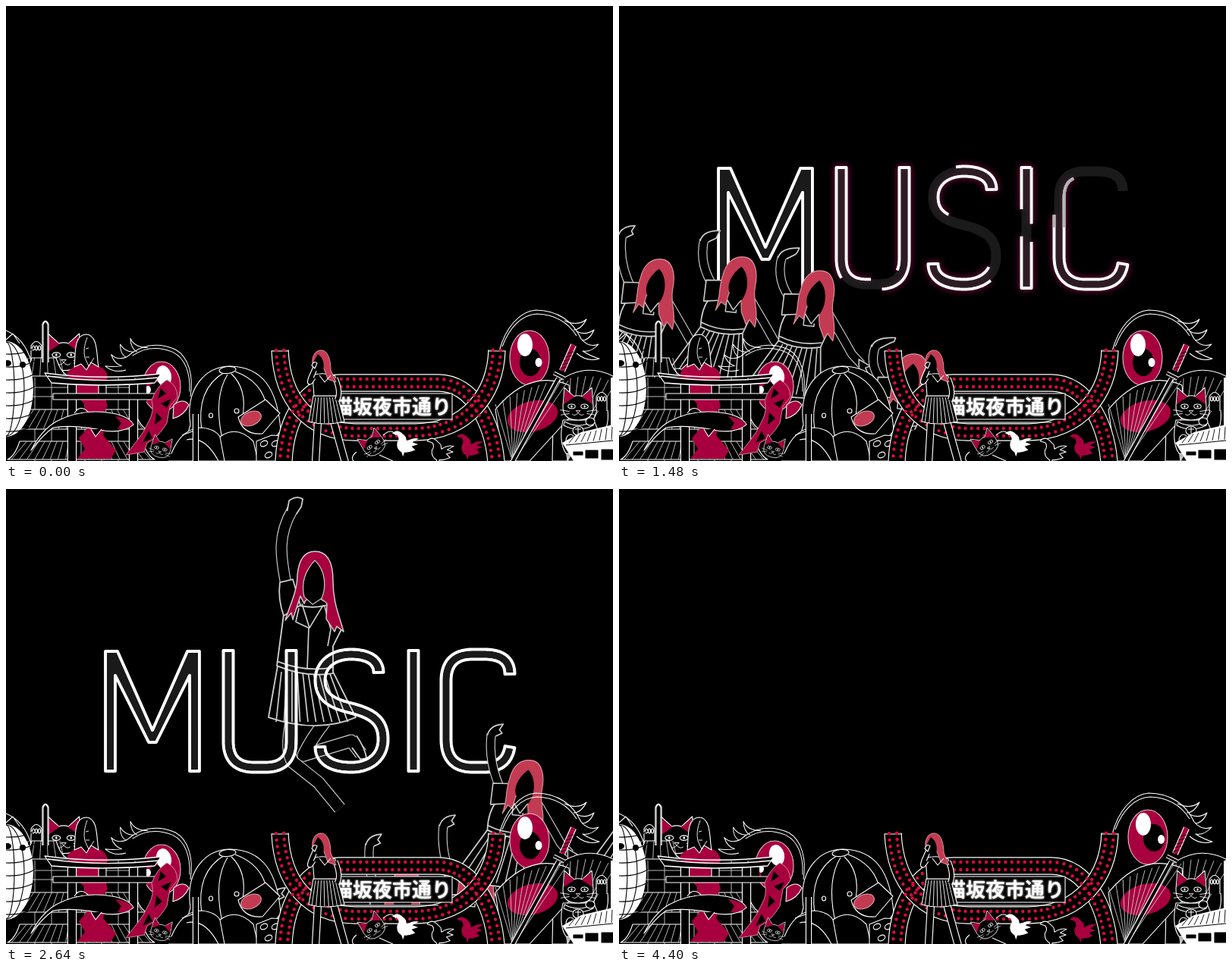
An HTML page with a canvas for the animation above (4.44 s loop, 800 px wide and 600 px high).

```html
<!DOCTYPE html>
<html lang="ja">
<meta charset="utf-8">
<title>MUSIC</title>
<style>
html,body{margin:0;width:100%;height:100%;overflow:hidden;background:#000}
canvas{display:block}
svg{position:absolute}
</style>
<canvas id="stage" width="800" height="600"></canvas>
<svg width="0" height="0"><path id="probe"/></svg>
<script>
const LOOP = 4440, STEP = 40;
const BLACK = '#000', WHITE = '#fff', RED = '#a8003f', ROSE = '#c23b52', GREY = '#ccc';
const stage = document.getElementById('stage').getContext('2d');
const probe = document.getElementById('probe');
let g = stage;

const clamp = v => Math.max(0, Math.min(1, v));
const mix = (a, b, p) => a + (b - a) * p;

// ---- drawing helpers ----
function shape(d, fill, line, w = 1.1) {
  const p = d instanceof Path2D ? d : new Path2D(d);
  if (fill) { g.fillStyle = fill; g.fill(p); }
  if (line) { g.strokeStyle = line; g.lineWidth = w; g.stroke(p); }
}
function tube(d, w, line = WHITE, fill = BLACK, edge = 2.3) {
  shape(d, null, line, w + edge);
  shape(d, null, fill, w);
}
function oval(x, y, rx, ry, fill, line, turn = 0) {
  const p = new Path2D();
  p.ellipse(x, y, rx, ry, turn, 0, 7);
  shape(p, fill, line);
}
function rays(n, f, line = WHITE, w = .9) {
  let d = '';
  for (let i = 0; i < n; i++) {
    const [a, b, c, e] = f(i);
    d += `M${a},${b}L${c},${e}`;
  }
  shape(d, null, line, w);
}
function placed(x, y, s, turn, draw) {
  g.save();
  g.translate(x, y); g.rotate(turn); g.scale(s, Math.abs(s));
  draw();
  g.restore();
}
function sample(d, step) {
  probe.setAttribute('d', d);
  const len = probe.getTotalLength(), n = Math.round(len / step), out = [];
  for (let i = 0; i <= n; i++) {
    const at = i / n * len;
    const p = probe.getPointAtLength(at);
    const a = probe.getPointAtLength(Math.max(0, at - .5));
    const b = probe.getPointAtLength(Math.min(len, at + .5));
    const m = Math.hypot(b.x - a.x, b.y - a.y) || 1;
    out.push([p.x, p.y, (b.y - a.y) / m, (a.x - b.x) / m]);
  }
  return out;
}

// ---- lettering ----
function contour(d, half = 6.6) {
  const pts = sample(d, 2.5);
  const side = k => pts.map(([x, y, nx, ny]) => `${x + nx * k},${y + ny * k}`);
  return 'M' + side(half).concat(side(-half).reverse()).join('L') + 'Z';
}
// into/done: outline drawn; out/fade: outline lost; dim: greyed area and its time span
const letters = [
  { d: 'M131,372V214H147L193,318 239,214H255V372H242V246L198,334H188L144,246V372Z',
    into: 300, done: 1000, out: 2950, fade: 1000 },
  { d: contour('M293,213V333Q293,367 327,367H342Q376,367 376,333V213'),
    into: 780, done: 1560, out: 3010, fade: 750, dim: [335, 200, 60, 180, 0, 1400] },
  { d: contour('M491,242C491,225 475,218 455,218C430,218 414,232 414,252C414,275 430,283 455,289C482,296 497,305 497,330C497,353 480,367 455,367C430,367 414,358 414,340'),
    into: 1130, done: 1680, out: 3280, fade: 930 },
  { d: contour('M537,213V372'),
    into: 860, done: 1580, out: 3200, fade: 550, dim: [520, 200, 40, 92, 1500, 2000] },
  { d: contour('M664,244C664,228 655,218 630,218H615Q580,218 580,253V330Q580,367 615,367H630Q660,367 664,340'),
    into: 1040, done: 1740, out: 3300, fade: 1000, start: 70, dim: [560, 200, 120, 92, 0, 2000] }
];
for (const l of letters) {
  probe.setAttribute('d', l.d);
  l.len = probe.getTotalLength();
  l.path = new Path2D(l.d);
}
function drawLetter(l, t) {
  const gone = clamp((t - l.out) / l.fade), p = clamp((t - l.into) / (l.done - l.into));
  g.save();
  g.globalAlpha = clamp((t - 40) / 400) * (1 - gone);
  if (p > 0) {
    const half = l.len / 2, a = half / 2 * p, b = half / 2 * clamp(p * 1.5 - .5);
    if (p < 1) {
      g.setLineDash(l.start ? [l.len * p, l.len] : [a, half - 2 * a, a + b, half - 2 * b, b, 0]);
      g.lineDashOffset = -(l.start || 0);
    }
    const leaving = t >= l.out ? clamp(1.25 - 1.7 * gone) : 0;
    const glow = t < l.done + 400 ? 1 : leaving;
    g.shadowColor = `rgba(230,20,120,${.8 * glow})`;
    g.shadowBlur = glow ? 8 : 0;
    shape(l.path, null, `rgb(255,${255 - 75 * leaving},${255 - 30 * leaving})`, 3.8);
    g.shadowBlur = 0;
    const [x, y, w, h, from, to] = l.dim || [];
    if (l.dim && t >= from && t < to) {
      g.save();
      g.beginPath(); g.rect(x, y, w, h); g.clip();
      shape(l.path, null, '#aaa', 4);
      g.restore();
    }
    // keep the glow out of the letter's body
    g.clip(l.path);
    if (glow) shape(l.path, 'rgba(0,0,0,.55)');
    shape(l.path, null, `rgb(255,${255 - 75 * leaving},${255 - 30 * leaving})`, 3.8);
    if (l.dim && t >= from && t < to) {
      g.beginPath(); g.rect(x, y, w, h); g.clip();
      shape(l.path, null, '#aaa', 4);
    }
  }
  g.restore();
}
function drawBody(l, t) {
  g.save();
  g.globalAlpha = clamp((t - 40) / 400) * (1 - clamp((t - l.out) / l.fade));
  shape(l.path, 'rgba(255,255,255,.1)');
  g.restore();
}

// ---- dancers ----
// each row: time, x, y of the head
const dancers = [
  [[600, -60, 640], [1120, -2, 372], [1800, 92, 430], [2200, 130, 640]],
  [[800, 40, 640], [1120, 87, 393], [1800, 213, 390], [2280, 248, 484], [2550, 262, 640]],
  [[900, 165, 640], [1120, 195, 447], [1800, 315, 369], [2280, 375, 420], [2700, 400, 640]],
  [[1080, 362, 680], [1800, 408, 374], [2280, 490, 384], [2850, 540, 640]],
  [[1400, 450, 640], [1800, 505, 417], [2280, 588, 368], [2900, 640, 640]],
  [[1600, 590, 640], [1800, 618, 494], [2280, 682, 384], [3000, 678, 450], [3300, 690, 640]],
  [[1900, 730, 640], [2280, 788, 432], [2600, 850, 370], [3000, 900, 640]]
];
function track(keys, t) {
  const i = keys.findIndex(k => k[0] > t) - 1;
  if (i < 0) return null;
  const a = keys[i], b = keys[i + 1], span = b[0] - a[0], u = (t - a[0]) / span;
  const slope = (j, c) => {
    const p = keys[Math.max(0, j - 1)], q = keys[Math.min(keys.length - 1, j + 1)];
    return (q[c] - p[c]) / (q[0] - p[0]) * span;
  };
  return [1, 2].map(c => {
    const v = u * u * (3 - 2 * u);
    return mix(a[c], b[c], v) + slope(i, c) * u * (1 - u) ** 2 - slope(i + 1, c) * u * u * (1 - u);
  });
}
function dancer(p) {
  const m = (a, b) => mix(a, b, p);
  shape('M-42,64Q-15,74 14,66L22,132Q-30,142 -78,128Z', BLACK, GREY, 1.7);
  rays(8, i => [-36 + 6.5 * i, 68, -68 + 11.5 * i, 132], GREY, 1.5);
  tube('M20,22Q40,48 56,70L70,82', 10, GREY);
  shape('M66,76L82,83 76,86 80,93 68,90Z', BLACK, GREY, 1.5);
  const wx = m(-50, -52), wy = m(-36, -62);
  tube(`M-29,12Q${m(-58, -52)},${m(-6, -24)} ${wx},${wy}`, 10, GREY);
  shape(`M${wx - 5},${wy + 2}Q${wx - 3},${wy - 12} ${m(-24, -38)},${m(-50, -77)}L${m(-25, -42)},${m(-45, -69)} ${m(-32, -38)},${m(-42, -65)} ${wx + 6},${wy + 2}`, BLACK, GREY, 1.7);
  shape('M-32,6Q-10,22 12,10L26,30 14,66Q-15,74 -42,64Q-44,40 -34,24Z', BLACK, GREY, 1.7);
  shape('M-42,58Q-15,68 15,60M-42,2L-22,0 -18,26 -42,30Z', BLACK, GREY, 1.6);
  shape('M-15,20L-2,37 11,16M-12,24V40H2V36', null, GREY, 1.5);
  shape('M2,-34C18,-36 25,-18 23,4C22,22 32,34 29,56L21,47 17,54 9,38L6,18 -10,14 -13,32 -19,28 -25,40C-20,20 -25,10 -21,-6C-19,-24 -10,-33 2,-34Z', ROSE, '#d8909c', 1.2);
  shape('M2,-21C14,-12 15,10 8,22L-2,28 -9,16C-16,4 -8,-12 2,-21Z', BLACK);
}
function jumper(t) {
  const fall = 6.82e-4 * (t - 2708) ** 2 - 58, bend = 22 * clamp((2700 - t) / 420);
  placed(0, fall, 1, 0, () => {
    tube('M420,362Q402,385 392,406L455,387 468,404', 15, GREY);
    tube('M377,358Q368,400 378,415L412,442 440,476', 15, GREY);
    shape('M462,380Q474,398 475,410L467,411 456,396', BLACK, GREY, 1.8);
    shape('M358,288Q395,304 431,296L461,356Q410,378 346,356Z', BLACK, GREY, 1.9);
    rays(10, i => [363 + 7 * i, 296, 356 + 10.5 * i, 362], GREY, 1.7);
    tube(`M371,190C${362 - bend / 2},140 ${360 - bend / 2},115 ${376 + bend / 2},82`, 13, GREY);
    shape(`M${369 + bend / 2},84L${370 + bend},70Q${380 + bend},63 ${388 + bend},68L${386 + bend},78 ${381 + bend / 2},88`, BLACK, GREY, 1.8);
    shape('M372,204Q402,216 430,206L442,240 431,262 431,298Q395,304 357,288Q362,250 366,220Z', BLACK, GREY, 1.9);
    shape('M357,282Q395,297 431,290M361,178L378,174 388,208 366,222Q358,200 361,178Z', BLACK, GREY, 1.8);
    shape('M390,206L400,238 418,208M386,212L382,230 399,238 397,292M420,210L428,240 424,262', null, GREY, 1.7);
    shape('M407,137C424,137 431,152 431,176C431,204 438,218 445,243L436,236 433,243 422,226 423,206C415,196 394,196 393,206L388,196 378,227 376,218 368,228C374,208 384,190 384,168C386,148 394,137 407,137Z', RED, GREY, 1.5);
    shape('M407,149C422,163 422,185 416,199L404,207 393,197C389,180 393,164 407,149Z', BLACK, GREY, 1.2);
  });
}

// ---- street front ----
function cat() {
  shape('M-21,0L-19,-25L-6,-13Q0,-15 6,-13L19,-25L21,0Q22,20 0,20Q-22,20 -21,0Z', BLACK, WHITE);
  shape('M-20,-2L-18,-22L-5,-12ZM20,-2L18,-22L5,-12Z', RED);
  for (const x of [-9, 9]) { oval(x, 1, 5, 3, BLACK, WHITE); oval(x, 1, 1.2, 1.6, WHITE); }
  shape('M-3,7H3L0,10ZM0,10Q-4,15 -8,12M0,10Q4,15 8,12M-12,8L-25,6M-12,11L-24,13M12,8L25,6M12,11L24,13', null, WHITE, .9);
}
function paw(x, y) {
  shape(`M${x - 7},${y + 16}V${y - 3}Q${x},${y - 14} ${x + 7},${y - 3}V${y + 16}`, BLACK, WHITE);
  for (let i = -4; i < 5; i += 4) oval(x + i, y, 1.5, 3, null, WHITE);
}
function lashes() {
  shape('M0,0C8,-30 26,-52 48,-54C78,-54 98,-38 108,-16M4,-6C14,-32 30,-48 50,-49C76,-48 92,-36 102,-20', null, WHITE);
  shape('M86,-40Q104,-32 115,-42Q108,-28 98,-28M102,-26Q114,-20 125,-28Q119,-14 109,-14M108,-16Q118,-4 131,-9Q121,2 110,0Q121,7 132,10Q116,15 102,3', null, WHITE);
}
function eyes(shift) {
  const dx = 7 * shift, dy = -5 * shift;
  placed(243, 515, -.9, .42, lashes);
  placed(650, 455, 1, 0, lashes);
  oval(690 + dx, 464 + dy, 26, 36, RED, '#e8c0cc');
  oval(691 + 2 * dx, 470 + 2 * dy, 14, 18, BLACK);
  oval(684 + dx, 447 + dy, 10, 15, WHITE);
  oval(702 + 1.8 * dx, 470 + 1.6 * dy, 4.5, 6, WHITE);
  oval(205, 502 + dy, 25, 33, RED, '#e8c0cc');
  oval(200, 510 + dy, 13, 14, BLACK);
  oval(208, 488 + dy, 10, 14, WHITE, null, -.2);
  oval(187, 506 + dy, 4, 5, WHITE);
}
function roof(x1, x2, y, h) {
  const mid = (x1 + x2) / 2, n = Math.round((x2 - x1) / 10);
  shape(`M${x1 + 16},${y}H${x2 - 16}Q${x2 - 10},${y + h * .8} ${x2},${y + h}H${x1}Q${x1 + 10},${y + h * .8} ${x1 + 16},${y}Z`, BLACK, WHITE);
  rays(n, i => {
    const x = x1 + (i + .5) * (x2 - x1) / n;
    return [mid + (x - mid) * .78, y, x, y + h];
  }, GREY);
}
function leftSide() {
  shape('M30,490H185V600H20Z', BLACK);
  rays(7, i => [38 + 22 * i, 490, 38 + 22 * i, 600], GREY);
  rays(2, i => [34, 503 + 12 * i, 172, 503 + 12 * i], GREY);
  roof(18, 82, 464, 24);
  roof(14, 185, 532, 26);
  roof(2, 196, 574, 24);
  tube('M49,470V420Q52,413 55,420V470', 1);
  shape('M49,470V420Q52,413 55,420V470', BLACK, WHITE);
  oval(0, 505, 36, 63, WHITE);
  for (const r of [11, 24]) oval(0, 505, r, 62, null, BLACK);
  for (let y = 455; y < 560; y += 17) shape(`M0,${y + 4}Q22,${y + 5} 38,${y - 4}`, null, BLACK);
  shape('M0,428Q24,438 33,468M0,440L9,432 18,445', null, WHITE);
  oval(2, 471, 5, 4, BLACK); oval(22, 473, 4, 4, BLACK);

  shape('M80,486Q84,474 106,472Q130,472 134,488L130,512 134,528Q124,540 132,552L128,566 145,586 138,597H94L104,584 96,570 108,556 98,544 104,526 92,512Z', RED);
  shape('M90,476C92,462 88,433 106,433C122,434 119,462 122,476L112,470 106,480 99,472Z', BLACK, WHITE);
  shape('M107,437Q101,452 104,464L109,475 116,464M105,452L109,451M105,463H110', null, WHITE, .9);

  tube('M87,498V600M168,498V600', 10);
  shape('M62,511H200V519H62ZM122,499H132V511H122Z', BLACK, WHITE);
  shape('M51,484Q125,494 204,485L196,497Q125,503 60,497ZM55,488Q125,498 201,490', BLACK, WHITE, 1.3);

  shape('M33,586Q46,560 66,548Q100,530 140,537Q162,541 168,552Q150,566 120,558Q84,552 62,556Q48,566 33,586Z', BLACK, WHITE);
  shape('M144,541Q164,544 167,552Q158,560 147,558L152,550Z', RED);
  shape('M90,537Q98,525 108,535M112,558L118,568 126,558', BLACK, WHITE);
  shape('M212,493Q226,500 226,516L216,528 212,550Q200,570 186,576L182,588 158,592 172,574Q182,562 188,548Q196,534 192,520Q198,502 212,493Z', RED, '#d890a0', .9);
  shape('M204,504L211,511 200,518ZM218,518L212,530 204,524ZM198,536L206,544 196,552ZM188,560L193,570 180,576Z', BLACK);
  shape('M221,526Q234,516 241,526Q235,540 220,544Z', RED, WHITE);
  placed(204, 583, .62, .25, cat);
}
function cap() {
  shape('M243,552C236,505 262,475 296,475C338,476 358,505 362,560L330,600H230Z', BLACK, WHITE);
  shape('M288,483Q250,505 258,560M292,486Q274,515 284,566M297,485Q318,505 312,540M302,482Q338,495 344,530', null, WHITE);
  oval(292, 480, 11, 4.5, BLACK, WHITE, -.1);
  oval(304, 534, 3, 3, null, WHITE); oval(270, 540, 2.5, 3, null, WHITE);
  shape('M306,542L342,519 361,537 338,564Q312,566 306,542Z', BLACK, WHITE);
  oval(323, 544, 14, 9, ROSE, '#e0a0a8', -.4);
  shape('M218,590Q232,556 258,556Q276,558 282,568Q304,552 326,574L332,600H214', BLACK, WHITE);
  shape('M238,572Q262,566 280,600M282,568L288,600M232,566L248,560', null, WHITE);
  tube('M250,538V600', 6);
  // spotted blocks
  shape('M330,574L350,566 424,570 430,600H330Z', BLACK, WHITE);
  for (let i = 0; i < 12; i++) oval(340 + 15 * (i % 6) + (i > 5 ? 6 : 0), i > 5 ? 592 : 577, 5, 3.5, null, WHITE, -.5);
}
const bands = [
  'M366,602C368,540 400,497 440,497H570C615,497 642,550 646,602',
  'M361,454C364,520 400,561 460,562H540C610,560 645,510 647,454'
];
const bulbs = bands.flatMap(d => sample(d, 8.5));
function gate(bulbColour) {
  shape('M372,600L385,560 430,548H580L630,556 640,600Z', BLACK);
  for (const d of bands) tube(d, 21);
  shape('M350,455H373M635,455H658', null, WHITE);
  g.fillStyle = bulbColour;
  for (const [x, y, nx, ny] of bulbs)
    for (const k of [-5, 5]) {
      g.beginPath(); g.arc(x + nx * k, y + ny * k, 2.2, 0, 7); g.fill();
    }
  shape('M420,511H588V545H420Z', BLACK, WHITE);
  shape('M440,549H570', null, WHITE);
  g.save();
  g.font = 'bold 26px "Noto Sans CJK JP","Noto Sans CJK",sans-serif';
  g.textAlign = 'right'; g.textBaseline = 'middle';
  g.fillStyle = WHITE;
  g.shadowColor = WHITE; g.shadowBlur = 3;
  g.fillText('灯猫坂夜市通り', 587, 528);
  g.restore();
}
function bird(x, y, fill, line) {
  placed(x, y, .95, 0, () => shape('M-19,-15Q-13,-22 -6,-16L0,-10 1,-4Q10,-10 18,-8L9,-3 17,0 8,3 13,8Q4,12 -2,11L-4,17 -6,11Q-14,6 -12,-3Q-8,-8 -12,-13Z', fill, line));
}
function schoolgirl() {
  tube('M411,548L408,602M432,548L447,602', 8);
  shape('M405,514H437L446,548Q420,554 399,548Z', BLACK, WHITE);
  rays(8, i => [408 + 3.7 * i, 516, 403 + 5.6 * i, 550]);
  shape('M404,487Q418,482 434,488L437,514H406Z', BLACK, WHITE);
  tube('M434,491Q442,510 436,520M405,490Q398,502 402,490L409,474', 5);
  shape('M414,454C425,453 428,468 428,480L435,496 424,492 419,478 408,474 404,472C403,464 406,455 414,454Z', ROSE, '#e8a0ac', .9);
  shape('M411,459Q421,466 418,481L412,485Q405,476 406,468Z', BLACK);
  shape('M403,474Q406,467 410,471L407,478Z', BLACK, WHITE);
  shape('M413,487L420,496 428,487', null, WHITE);
}
function rightSide() {
  shape('M722,500Q760,468 800,488V600H720Z', BLACK, WHITE);
  rays(9, i => [740, 600, 724 + 10 * i, 497 - 9 * Math.sin(i / 2.6)], GREY);
  shape('M645,532Q690,478 742,500L745,540 690,600H655Z', BLACK, WHITE);
  oval(694, 541, 34, 20, RED, null, -.25);
  rays(11, i => [668, 602, 645 + 9.6 * i, 530 - 36 * Math.sin((i + 1) / 7)], GREY);
  tube('M728,491L667,602', 4);
  tube('M748,447L733,481', 6, WHITE, RED);
  rays(6, i => [748 - 2.4 * i, 456 + 5 * i, 740 - 2.4 * i, 458 + 5 * i], BLACK);
  tube('M722,484L736,491', 3);
  shape('M734,546Q728,575 738,590H782Q786,566 774,546Z', BLACK, WHITE);
  paw(785, 518);
  shape('M779,533L772,552M793,533Q796,560 778,574', null, WHITE);
  placed(754, 527, .95, 0, cat);
  shape('M736,548Q754,558 774,548L774,553Q754,563 735,553Z', BLACK, WHITE);
  oval(754, 560, 7, 6, BLACK, WHITE);
  shape('M750,558H758M754,555V565', null, WHITE);
  oval(744, 573, 6, 8, BLACK, WHITE); oval(770, 548, 6, 5, BLACK, WHITE);
  shape('M797,490H800V560H797Z', WHITE);
  shape('M733,576L758,562 800,552V600H748Z', WHITE);
  rays(9, i => [750 + 7 * i, 566 - 1.6 * i, 742 + 8 * i, 576 - .6 * i], BLACK);
  shape('M738,579L800,573M748,588H760V592H748ZM764,586H780V596H764ZM785,585H800V598H785Z', BLACK, BLACK);
}
function front(bulbColour) {
  const layer = document.createElement('canvas');
  layer.width = 800; layer.height = 600;
  g = layer.getContext('2d');
  g.lineJoin = 'round';
  leftSide();
  cap();
  rightSide();
  gate(bulbColour);
  placed(484, 578, .7, -.6, cat);
  shape('M462,588Q452,596 460,602M492,592L510,600M497,566Q508,556 514,566', null, WHITE);
  bird(527, 578, WHITE);
  bird(573, 588, BLACK, WHITE);
  bird(612, 582, RED);
  schoolgirl();
  g = stage;
  return layer;
}
const bright = front('#d80c3c'), dull = front(RED);

// ---- playback ----
function paint(t) {
  g.fillStyle = BLACK;
  g.fillRect(0, 0, 800, 600);
  g.lineJoin = 'round';
  if (t > 1800 && t < 3700) jumper(t);
  for (const l of letters) { drawLetter(l, t); drawBody(l, t); }
  for (const keys of dancers) {
    const at = track(keys, t);
    if (at) placed(...at, 1, .12, () => dancer(clamp((t - keys[0][0] - 350) / 600)));
  }
  const duck = 58 * Math.sin(Math.PI * clamp((t - 1250) / 1150));
  placed(76, 459 + duck, 1.08, 0, cat);
  paw(40, 451 + duck);
  eyes(clamp((t - 4160) / 240));
  const low = t > 1500 && t < 2600 || t > 3300 && t < 3900;
  g.drawImage(low ? dull : bright, 0, 0);
}
function tick() {
  paint(Math.floor(performance.now() % LOOP / STEP) * STEP);
  requestAnimationFrame(tick);
}
tick();
</script>
</html>
```
